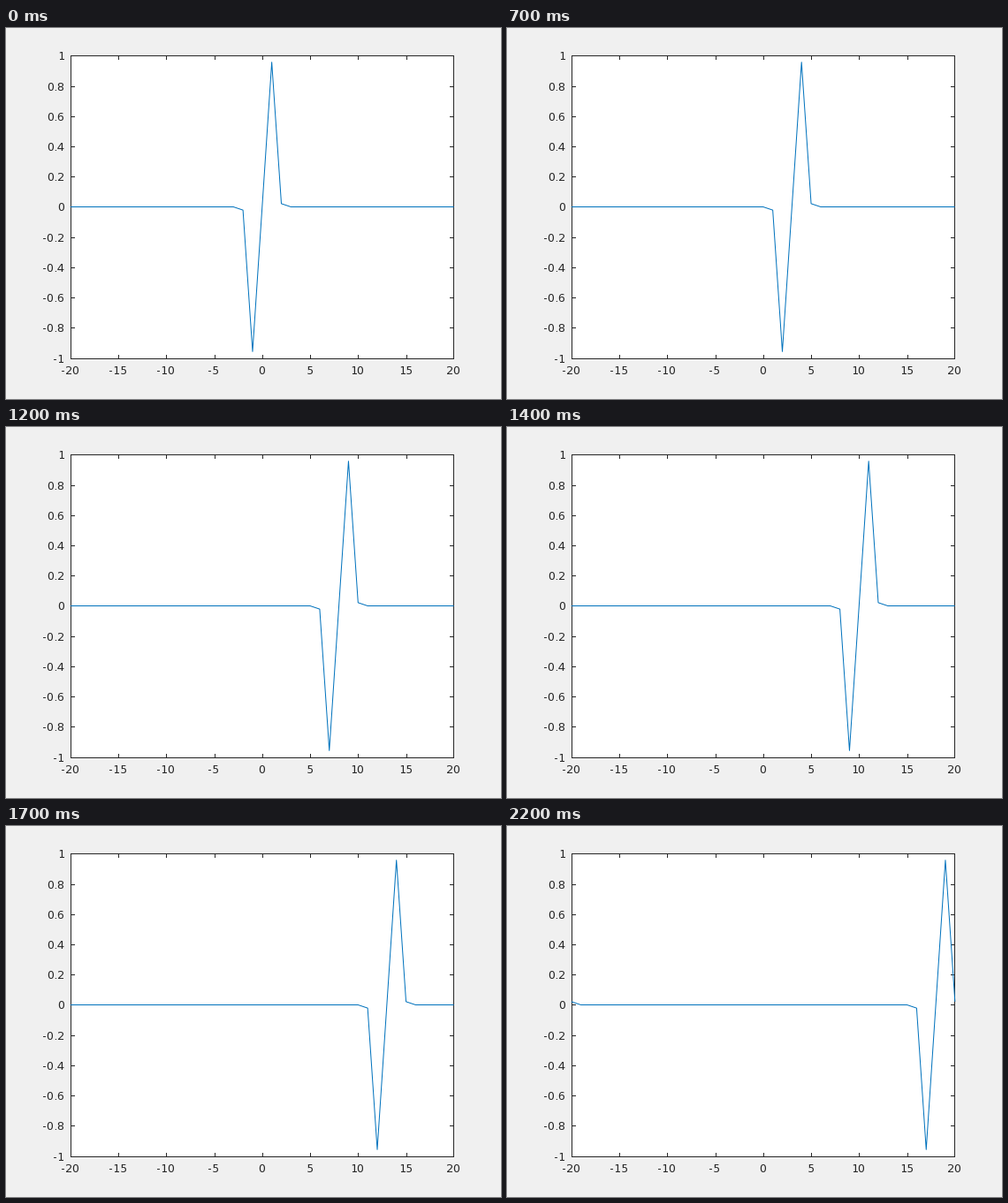
These frames come from a looping animation (560 px wide and 420 px high, 2.3 s). A matplotlib script:

```python
import numpy as np
import matplotlib.pyplot as plt
from matplotlib.animation import FuncAnimation
from matplotlib.patches import Rectangle

# whole-pixel glyph advances
plt.rcParams.update({"font.family": "DejaVu Sans", "text.hinting_factor": 1})

W, H, DPI = 560, 420, 80
PX = 72 / DPI  # one pixel in points
INK, BLUE, GREY = "#262626", "#0072BD", "#F0F0F0"
LEFT, RIGHT, TOP, BOTTOM = 73, 506, 31, 374
TICK = 4
HOLD, FRAMES, STEP_MS = 4, 23, 100


def to_x(x):
    return 289.8 + 10.85 * x


def to_y(y):
    return 202.5 - 171.15 * y


def pulse(x):
    return 4.29 * x * np.exp(-1.5 * x**2)


fig = plt.figure(figsize=(W / DPI, H / DPI), dpi=DPI, facecolor=GREY)
ax = fig.add_axes([0, 0, 1, 1])
ax.set(xlim=(0, W), ylim=(H, 0))
ax.axis("off")


def stroke(x0, y0, x1, y1):
    """One-pixel line through pixel centres, ends included."""
    ax.plot(np.array([x0, x1]) + 0.5, np.array([y0, y1]) + 0.5, color=INK,
            lw=PX, snap=False, solid_capstyle="projecting", zorder=2)


def label(x, y, value, ha):
    ax.text(x, y, f"{value:g}", ha=ha, va="baseline", color=INK,
            fontsize=13 * PX)


ax.add_patch(Rectangle((LEFT, TOP), RIGHT - LEFT + 1, BOTTOM - TOP + 1,
                       fc="white", ec="none", zorder=1))
for y in (TOP, BOTTOM):
    stroke(LEFT, y, RIGHT, y)
for x in (LEFT, RIGHT):
    stroke(x, TOP, x, BOTTOM)

for v in range(-20, 21, 5):
    x = min(max(round(to_x(v)), LEFT), RIGHT)
    stroke(x, BOTTOM, x, BOTTOM - TICK)
    stroke(x, TOP, x, TOP + TICK)
    label(to_x(v) - 0.7, 392, v, "center")

for k in range(-5, 6):
    y = min(max(round(to_y(k / 5)), TOP), BOTTOM)
    stroke(LEFT, y, LEFT + TICK, y)
    stroke(RIGHT, y, RIGHT - TICK, y)
    label(66.5, y + 5, k / 5, "right")

grid = np.arange(-20, 21)
curve, = ax.plot([], [], color=BLUE, lw=PX, snap=False,
                 solid_joinstyle="round", solid_capstyle="butt", zorder=3)


def draw(n):
    shift = max(0, n - HOLD)
    # the pulse travels on a ring of length 40
    u = pulse((grid - shift + 20) % 40 - 20)
    curve.set_data(to_x(grid), to_y(u))
    return curve,


anim = FuncAnimation(fig, draw, frames=FRAMES, interval=STEP_MS,
                     repeat=True, repeat_delay=0)
plt.show()
```
